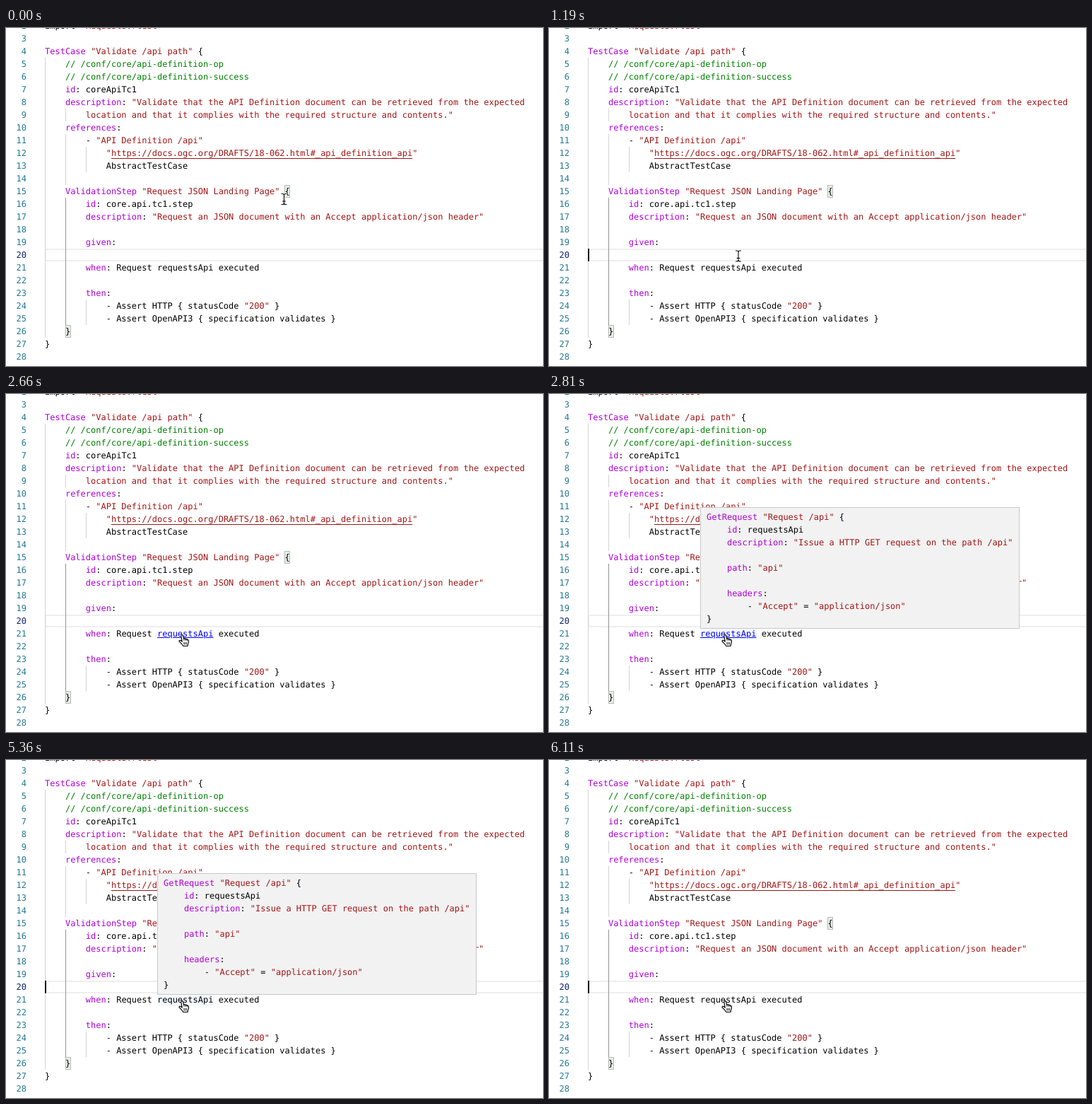
An HTML page that plays this animation: 760x478 px, repeating every 6560 ms.

```html
<!DOCTYPE html>
<html lang="en">
<head>
<meta charset="utf-8">
<title>Test case editor</title>
<style>
  html, body { margin: 0; width: 100%; height: 100%; overflow: hidden; background: #fff; }
  #stage { position: relative; width: 760px; height: 478px; overflow: hidden; }
  #stage > * { position: absolute; box-sizing: border-box; }
  pre {
    margin: 0; color: #000; white-space: pre;
    font: 12px/18px "DejaVu Sans Mono", monospace;
    text-rendering: geometricPrecision; font-variant-ligatures: none;
  }
  #numbers { top: -12px; left: 0; width: 29px; text-align: right; color: #237893; }
  #numbers .active { color: #0b216f; }
  #code { top: -12px; left: 55px; }
  .keyword { color: #af00db; }
  .string { color: #a31515; }
  .comment { color: #008000; }
  .url { text-decoration: underline; text-underline-position: under; }
  .link { color: #00f; text-decoration: underline; }
  .guide { width: 1px; background: #d3d3d3; }
  .guide.active { background: #939393; }
  .bracket { width: 8px; height: 18px; border: 1px solid #b9b9b9; background: #0064001a; }
  #line { left: 55px; top: 312px; width: 720px; height: 18px; border: 2px solid #eee; }
  #caret { left: 55px; top: 312px; width: 2px; height: 18px; background: #000; }
  #highlight { left: 214px; top: 330px; width: 80px; height: 18px; background: #add6ff26; }
  #popup {
    left: 214px; top: 160px; width: 452px; height: 172px; padding: 4px 8px;
    border: 1px solid #c8c8c8; background: #f2f2f2;
  }
  #pointers { left: 0; top: 0; }
</style>
</head>
<body>
<div id="stage">
  <div id="line"></div>
  <div id="highlight"></div>
  <div class="bracket" style="left:394px;top:222px"></div>
  <div class="bracket" style="left:84px;top:420px"></div>
  <pre id="numbers"></pre>
  <pre id="code"></pre>
  <div id="caret"></div>
  <pre id="popup"></pre>
  <svg id="pointers" width="760" height="478" fill="none" stroke-linecap="round" stroke-linejoin="round">
    <defs>
      <path id="beamShape" d="M-3.5-7.5h1.5q2 0 2 2v11q0 2-2 2h-1.5M3.5-7.5h-1.5q-2 0-2 2M3.5 7.5h-1.5q-2 0-2-2M-2 3h4"/>
    </defs>
    <g id="beam">
      <use href="#beamShape" stroke="#fff" stroke-width="2.4"/>
      <use href="#beamShape" stroke="#000" stroke-width="1.1"/>
    </g>
    <g id="hand" transform="translate(244 340)" stroke="#000">
      <path fill="#fff" stroke-width="1.2" d="M5.2 10.2L3.8 2.6Q3.6 .9 5 .7 6.3.6 6.7 2.2L7.6 6.2Q9 5.2 9.9 6.6 11.4 5.8 12.2 7.3 13.9 6.8 14.3 8.7 14.7 11.5 13.4 14L13 16.5H6.8Q5.8 14.6 3.6 12.4 1.5 10.6 1 9.6.9 8.2 2.4 8.3 4 8.8 5.2 10.2Z"/>
      <path stroke-width=".8" d="M7.6 6.2l.4 2.3M9.9 6.6l.4 2M12.2 7.3l.2 1.6M7.7 11.2l.3 3M9.6 11.2l.1 3M11.5 11.2v3"/>
    </g>
  </svg>
</div>
<script>
const $ = id => document.getElementById(id);

const source = `import "Requests.rtest"

TestCase "Validate /api path" {
    // /conf/core/api-definition-op
    // /conf/core/api-definition-success
    id: coreApiTc1
    description: "Validate that the API Definition document can be retrieved from the expected
        location and that it complies with the required structure and contents."
    references:
        - "API Definition /api"
            "https://docs.ogc.org/DRAFTS/18-062.html#_api_definition_api"
            AbstractTestCase

    ValidationStep "Request JSON Landing Page" {
        id: core.api.tc1.step
        description: "Request an JSON document with an Accept application/json header"

        given:

        when: Request requestsApi executed

        then:
            - Assert HTTP { statusCode "200" }
            - Assert OpenAPI3 { specification validates }
    }
}
`;

const definition = `GetRequest "Request /api" {
    id: requestsApi
    description: "Issue a HTTP GET request on the path /api"

    path: "api"

    headers:
        - "Accept" = "application/json"
}`;

const tokens = /(?<comment>\/\/.*)|(?<string>"[^"]*")|(?<keyword>\b(?:\w+(?=:)|TestCase\b|ValidationStep\b|GetRequest\b))/g;

function colour(text) {
  return text.replace(tokens, (token, comment, string) => {
    const kind = comment ? 'comment' : string ? 'string' : 'keyword';
    return `<span class=${kind}>${token}</span>`;
  });
}

$('code').innerHTML = colour(source)
  .replace(/https:[^"]*/, '<span class=url>$&</span>')
  .replace(/requestsApi(?= executed)/, '<span id=target>$&</span>');
$('popup').innerHTML = colour(definition);
$('numbers').innerHTML = Array.from({length: 27}, (_, i) => i + 2)
  .map(n => n === 20 ? `<span class=active>${n}</span>` : n).join('\n');

// Indent guides: x, first line, last line
function guide(x, first, last, kind = '') {
  const bar = document.createElement('div');
  bar.className = 'guide ' + kind;
  bar.style.cssText = `left:${x}px;top:${18 * first - 48}px;height:${18 * (last - first + 1)}px`;
  $('stage').insertBefore(bar, $('numbers'));
}
guide(55, 5, 26);
guide(84, 9, 9);
guide(84, 11, 14);
guide(113, 12, 13);
guide(84, 16, 25, 'active');
guide(113, 24, 25);

const LOOP = 6560;
const moveTimes = [0, 150, 300, 450, 590, 740, 890, 1040, 1190, 1640, 1790, 1930, 2080, 2230, 2380, 2520];
const caretToggles = [150, 590, 1190, 1640, 2080, 2660, 3110, 3560, 4160, 4610, 5060, 5660, 6110];

const mix = (a, b, k) => a + (b - a) * k;
const between = (t, a, b) => t >= a && t < b;
const show = (id, on) => $(id).style.visibility = on ? 'visible' : 'hidden';

function beamPosition(t) {
  if (t <= 1190) {
    const k = 1 - (1 - t / 1190) ** 2.67;
    return [mix(393.5, 268, k), mix(242, 322.5, k)];
  }
  if (t <= 1930) {
    const k = Math.max(0, (t - 1640 + 150) / 440);
    return [mix(268, 259.5, k), mix(322.5, 328, k)];
  }
  const k = (t - 1930) / 590;
  return [mix(259.5, 249.5, k), mix(328, 341, k)];
}

function draw(t) {
  const moved = moveTimes.filter(m => m <= t).pop();
  const [x, y] = beamPosition(moved).map(v => Math.round(v * 2) / 2);
  $('beam').setAttribute('transform', `translate(${x} ${y})`);
  show('beam', t < 2520);
  show('hand', t >= 2520);
  show('caret', caretToggles.filter(c => c <= t).length % 2);
  show('popup', between(t, 2810, 5660));
  show('highlight', between(t, 2810, 5660));
  $('target').className = between(t, 2520, 5360) ? 'link' : '';
}

const start = performance.now();
function tick() {
  draw((performance.now() - start) % LOOP);
  requestAnimationFrame(tick);
}
tick();
</script>
</body>
</html>
```
